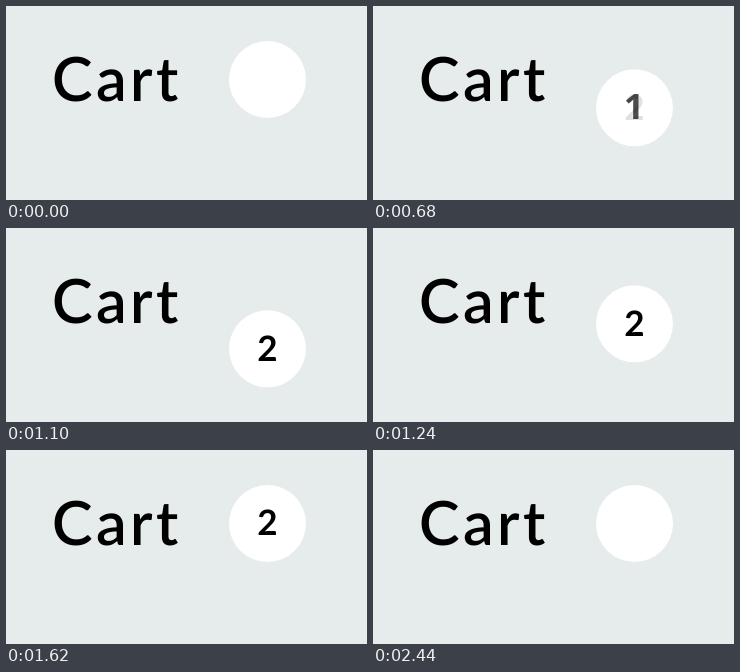
Write an HTML page that moves like this. It is 361 by 194 pixels and loops after 3.04 s.

```html
<!DOCTYPE html>
<html lang="en">
<head>
<meta charset="utf-8">
<title>Cart badge</title>
<style>
  html, body { margin: 0; width: 100%; height: 100%; overflow: hidden; background: #e6eceb; }
  svg { display: block; width: 361px; height: 194px; }
  text { font-family: Lato, sans-serif; font-weight: 700; text-rendering: geometricPrecision; }
  .title { font-size: 61px; font-weight: 600; letter-spacing: 3.4px; }
  .digit { font-size: 35px; text-anchor: middle; }
  #one { font-family: "Open Sans", sans-serif; }
</style>
</head>
<body>
<svg viewBox="0 0 361 194">
  <text class="title" x="46" y="94.5">Cart</text>
  <g id="badge">
    <circle cx="261.5" cy="73.5" r="38.5" fill="#fff"/>
    <text class="digit" id="two" x="261.5" y="85.3" opacity="0">2</text>
    <text class="digit" id="one" x="261" y="85" opacity="0">1</text>
  </g>
</svg>
<script>
  const LOOP = 3040, DROP = 52;
  const [badge, one, two] = ['badge', 'one', 'two'].map(id => document.getElementById(id));

  // cubic-bezier(.25, .1, .25, 1), solved for x by bisection
  function ease(x) {
    if (x <= 0) return 0;
    if (x >= 1) return 1;
    let low = 0, high = 1, s;
    for (let i = 0; i < 24; i++) {
      s = (low + high) / 2;
      if (0.75 * s * (1 - s) + s ** 3 < x) low = s; else high = s;
    }
    return 0.3 * s * (1 - s) ** 2 + 3 * s * s * (1 - s) + s ** 3;
  }

  function draw(now) {
    const t = now % LOOP;
    const step = (start, duration) => ease((t - start) / duration);
    const y = DROP * (step(586, 300) - step(1043, 600));
    badge.setAttribute('transform', `translate(0 ${y.toFixed(3)})`);
    one.setAttribute('opacity', step(260, 300) - step(640, 200));
    two.setAttribute('opacity', step(658, 200) - step(2145, 300));
  }

  const begin = performance.now();
  function frame() {
    draw(performance.now() - begin);
    requestAnimationFrame(frame);
  }
  frame();
</script>
</body>
</html>
```
